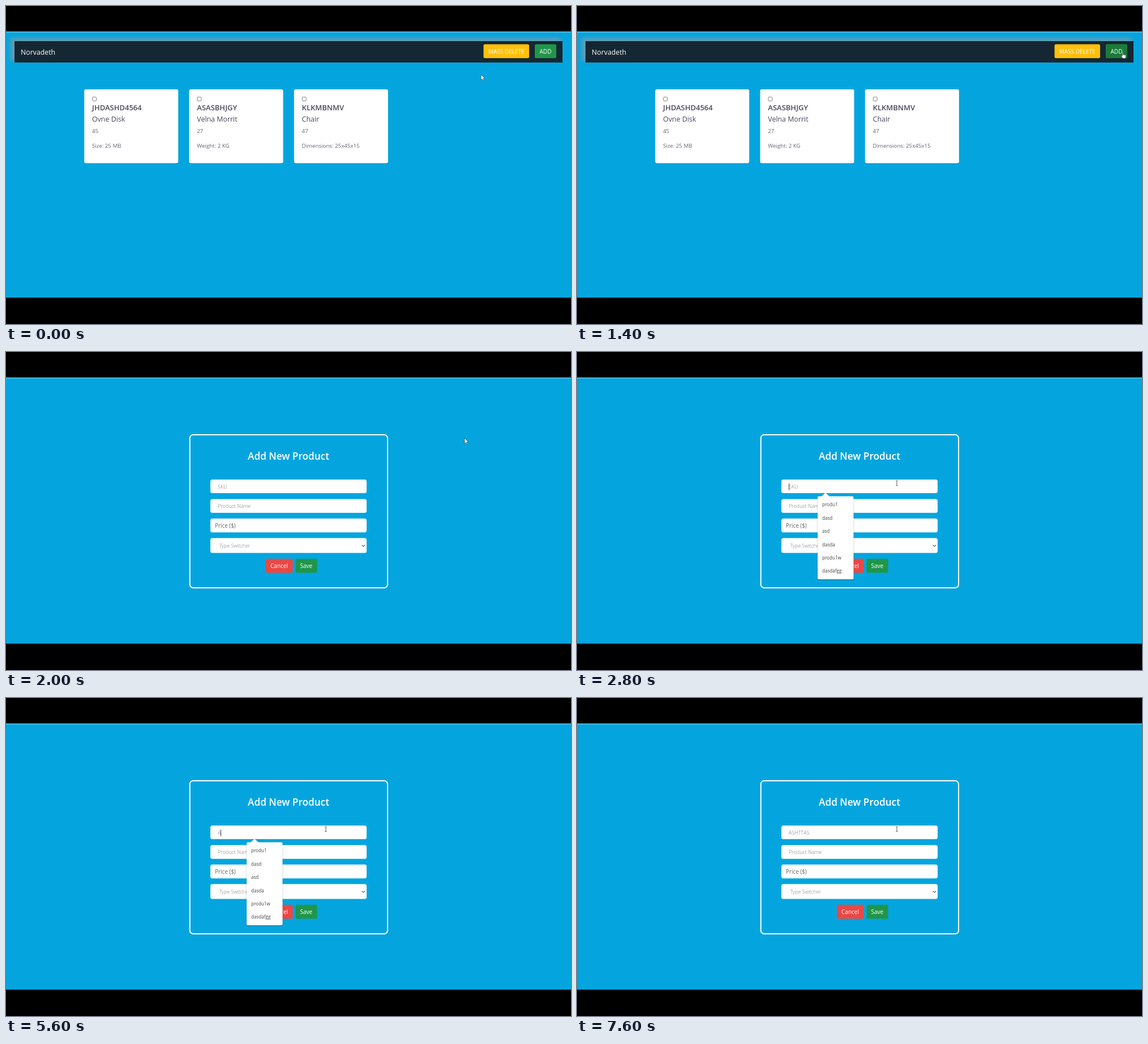
These frames come from a looping animation (998 by 561 pixels, 8000 ms). An HTML page:

```html
<!DOCTYPE html>
<html lang="en">
<head>
<meta charset="utf-8">
<title>Product list</title>
<style>
  html, body { margin: 0; width: 100%; height: 100%; overflow: hidden; background: #000; }
  #stage { position: absolute; left: 0; top: 0; width: 998px; height: 561px; overflow: hidden; }
  svg { display: block; font-family: "Open Sans", "Noto Sans", sans-serif; }

  /* Every change is a hard cut on a 200 ms grid: 2.5% of the loop. */
  #list, #form, #status, #hover, #arrow, #hand, #beam, #pointer,
  #suggest, #matches, #hint, #typed, #typed span, #caret {
    animation: 8s step-end infinite;
  }

  #list { animation-name: list; }
  #form, #typed { opacity: 0; animation-name: form; }
  #status { opacity: 0; animation-name: status; }
  #hover, #hand { opacity: 0; animation-name: hover; }
  #arrow { animation-name: arrow; }
  #beam { opacity: 0; animation-name: beam; }
  #pointer { animation-name: pointer; }
  #suggest { opacity: 0; animation-name: suggest; }
  #matches { opacity: 0; animation-name: matches; }
  #hint { animation-name: hint; }

  @keyframes list { 0% { opacity: 1 } 20%, 100% { opacity: 0 } }
  @keyframes form { 0% { opacity: 0 } 20%, 100% { opacity: 1 } }
  @keyframes status { 0% { opacity: 0 } 20% { opacity: 1 } 25%, 100% { opacity: 0 } }
  @keyframes hover { 0% { opacity: 0 } 12.5% { opacity: 1 } 20%, 100% { opacity: 0 } }
  @keyframes arrow { 0% { opacity: 1 } 12.5% { opacity: 0 } 20% { opacity: 1 } 27.5%, 100% { opacity: 0 } }
  @keyframes beam { 0% { opacity: 0 } 27.5%, 100% { opacity: 1 } }
  @keyframes suggest { 0% { opacity: 0 } 32.5% { opacity: 1 } 72.5%, 100% { opacity: 0 } }
  @keyframes matches { 0% { opacity: 0 } 72.5% { opacity: 1 } 77.5%, 100% { opacity: 0 } }
  @keyframes hint { 0% { opacity: 1 } 70%, 100% { opacity: 0 } }
  @keyframes pointer {
    0% { transform: translate(839px, 121px) }
    2.5% { transform: translate(856px, 118px) }
    5% { transform: translate(884px, 111px) }
    7.5% { transform: translate(914px, 102px) }
    10% { transform: translate(940px, 94px) }
    12.5% { transform: translate(957px, 85px) }
    15% { transform: translate(964px, 81px) }
    22.5% { transform: translate(926px, 100px) }
    25% { transform: translate(810px, 152px) }
    27.5% { transform: translate(640px, 214px) }
    30%, 100% { transform: translate(565px, 231px) }
  }

  #typed {
    position: absolute; left: 374px; top: 225.5px; height: 24px;
    display: flex; align-items: center;
    font: 300 9px/24px "Open Sans", "Noto Sans", sans-serif; color: #777;
  }
  /* Later letters reuse the first one's timing with a delay. */
  #typed span { font-size: 0; animation-name: letter; animation-delay: var(--d, 0s); }
  #caret { width: 1px; height: 12px; background: #444; opacity: 0; animation-name: caret; }
  @keyframes letter { 0% { font-size: 0 } 70%, 100% { font-size: 9px } }
  @keyframes caret {
    0% { opacity: 0 } 32.5% { opacity: 1 } 42.5% { opacity: 0 } 47.5% { opacity: 1 }
    52.5% { opacity: 0 } 62.5% { opacity: 1 } 95%, 100% { opacity: 0 }
  }

  .glow { filter: blur(3px); }
  .button { font-size: 10px; fill: #fff; text-anchor: middle; }
  .code { font-size: 13px; font-weight: 600; }
  .name { font-size: 12.4px; font-weight: 500; }
  .info { font-size: 9.7px; fill: #666273; }
  .field { font-size: 9px; font-weight: 300; fill: #777; }
  .option { font-size: 8.1px; fill: #444; }
  .popup { filter: drop-shadow(0 1px 1px rgba(0, 0, 0, .3)); }
</style>
</head>
<body>
<div id="stage">
  <svg width="998" height="561" viewBox="0 0 998 561">
    <rect width="998" height="561"/>
    <rect y="46" width="998" height="468.5" fill="#04a5df"/>
    <rect y="45" width="998" height="1.3" fill="#8fc3d6"/>

    <g id="list">
      <rect class="glow" x="8" y="56" width="972" height="41" fill="#7f9ba6" opacity=".75"/>
      <rect x="15" y="62" width="968" height="37.7" fill="#142733"/>
      <text x="26" y="86" font-size="12.3" fill="#fff">Norvadeth</text>
      <rect x="843.5" y="67.5" width="80.5" height="24.5" rx="2.5" fill="#ffbf0c"/>
      <text class="button" x="883.7" y="83.6">MASS DELETE</text>
      <rect x="934" y="67.5" width="38" height="24.5" rx="2.5" fill="#20964a"/>
      <rect id="hover" x="934" y="67.5" width="38" height="24.5" rx="2.5" fill="#1b7a38"/>
      <text class="button" x="953" y="83.6">ADD</text>
      <g id="cards" fill="#4c465c"></g>
    </g>

    <g id="form">
      <rect x="324.7" y="146" width="349.3" height="270" rx="6" fill="none" stroke="#fff" stroke-width="2"/>
      <text x="499" y="190" font-size="17.2" font-weight="600" fill="#fff" text-anchor="middle">Add New Product</text>
      <g fill="#fff">
        <rect x="361" y="225" width="276" height="24" rx="3.5"/>
        <rect x="361" y="259.5" width="276" height="24.3" rx="3.5"/>
        <rect x="361" y="293.7" width="276" height="24.6" rx="3.5"/>
        <rect x="361" y="328.2" width="276" height="26.2" rx="3.5"/>
      </g>
      <text id="hint" class="field" x="374" y="241">SKU</text>
      <text class="field" x="374" y="275">Product Name</text>
      <text x="369" y="310.3" font-size="9.9" fill="#666">Price ($)</text>
      <text class="field" x="376.7" y="345.3" style="font-size:8.8px">Type Switcher</text>
      <path d="M628.7 340.5l2.7 2.7 2.7-2.7" fill="none" stroke="#666" stroke-width="1.2"/>
      <rect x="459" y="364.7" width="47.5" height="24.8" rx="2" fill="#ec4744"/>
      <text class="button" x="482.5" y="381">Cancel</text>
      <rect x="511.5" y="364.7" width="38" height="24.8" rx="2" fill="#20964a"/>
      <text class="button" x="530.4" y="381">Save</text>

      <g id="suggest">
        <path class="popup" d="M425 256.500q0-2 2-2h5l7-6 7 6h40.500q2 0 2 2v142.500q0 2-2 2h-59.500q-2 0-2-2z" fill="#fff"/>
      </g>
      <g id="matches">
        <path d="M425 256.500q0-2 2-2h5l7-6 7 6h47q2 0 2 2v53.500h-70z" fill="#fff"/>
      </g>
    </g>

    <g id="status">
      <path d="M0 500.500h329q2.500 0 2.500 2.500v11.500H0z" fill="#c9e3bd"/>
      <text x="3" y="510.200" font-size="7.1" fill="#444">Waiting for mirrok.devo.plune.co...</text>
    </g>

    <g id="pointer">
      <path id="arrow" d="M0 0v9.500l2.200-2 1.600 3.500 1.600-.7-1.600-3.400h3z" fill="#fff" stroke="#234" stroke-width=".6"/>
      <path id="hand" d="M-.8 1q.8-1.400 1.600 0v3.700l4 .9q1 .3.900 1.400l-.7 4.500h-5l-2.900-4.300q.5-1.300 2.100.2z" fill="#fff" stroke="#123" stroke-width=".6"/>
      <path id="beam" d="M-1.700-4h1.200l.5.400.5-.4h1.200M0-3.600v7.700M-1.700 4.500h1.200l.5-.4.500.4h1.200" fill="none" stroke="#444" stroke-width=".9"/>
    </g>
  </svg>
  <div id="typed">
    <span>A</span><span style="--d:.4s">S</span><span style="--d:.6s">H</span><span style="--d:.8s">T</span><span style="--d:1s">T</span><span style="--d:1.2s">A</span><span style="--d:1.4s">S</span>
    <i id="caret"></i>
  </div>
</div>
<script>
  const byId = id => document.getElementById(id);
  const text = (kind, x, y, value) => `<text class="${kind}" x="${x}" y="${y}">${value}</text>`;

  const products = [
    ["JHDASHD4564", "Ovne Disk", "45", "Size: 25 MB"],
    ["ASASBHJGY", "Velna Morrit", "27", "Weight: 2 KG"],
    ["KLKMBNMV", "Chair", "47", "Dimensions: 25x45x15"]
  ];
  byId("cards").innerHTML = products.map(([code, name, price, detail], i) => {
    const left = 138.2 + i * 185.3, x = left + 13.8;
    return `<rect x="${left}" y="147" width="166" height="130.300" rx="3" fill="#fff"/>
      <rect x="${x + .7}" y="160.700" width="6.800" height="6.800" rx="1" fill="#fff" stroke="#777" stroke-width=".9"/>` +
      text("code", x, 183.5, code) + text("name", x, 204.3, name) +
      text("info", x, 224, price) + text("info", x, 250, detail);
  }).join("");

  const addOptions = (id, options) => {
    byId(id).innerHTML += options.map((o, i) => text("option", 433, 272.3 + i * 23.4, o)).join("");
  };
  addOptions("suggest", ["produ1", "dasd", "asd", "dasda", "produ1w", "dasdafgg"]);
  addOptions("matches", ["af", "ASASBHJGY"]);
</script>
</body>
</html>
```
